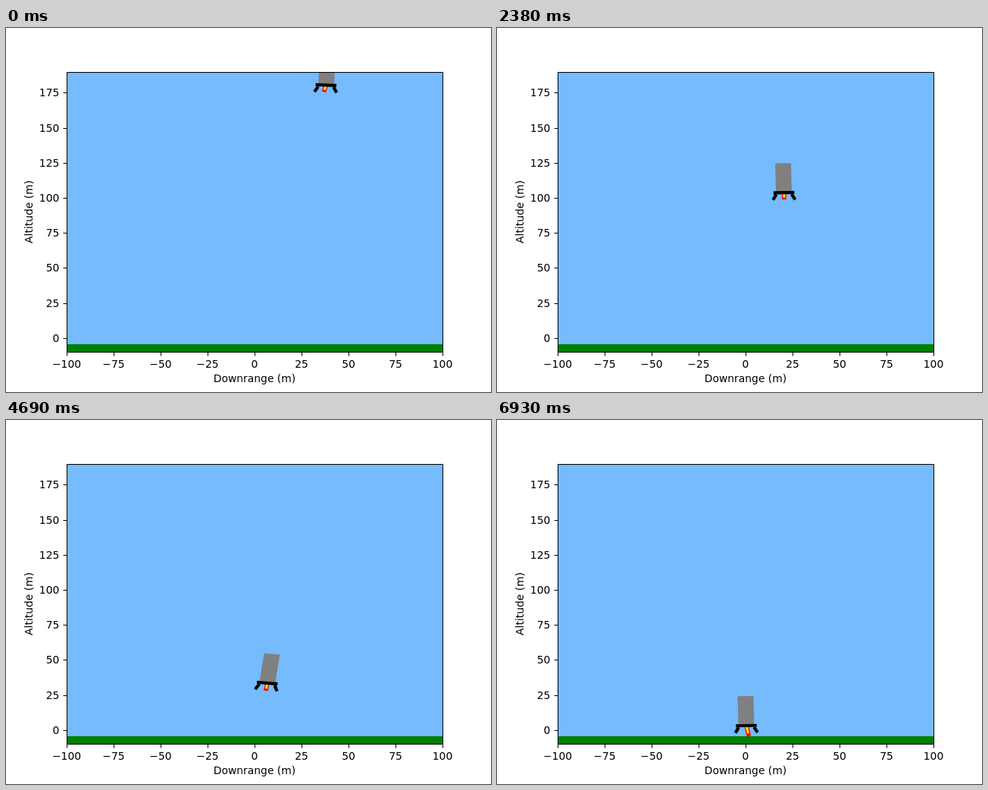
Write an HTML page that moves like this. It is 640 px wide and 480 px high and loops after 7000 ms.

```html
<!DOCTYPE html>
<html lang="en">
<head>
<meta charset="utf-8">
<title>Rocket landing</title>
<style>
  html, body { margin: 0; width: 100%; height: 100%; overflow: hidden; background: #fff; }
  svg { display: block; width: 640px; height: 480px; }
  text { font: 13.89px "DejaVu Sans", sans-serif; }
</style>
</head>
<body>
<svg viewBox="0 0 640 480">
  <defs><clipPath id="plot"><rect x="80" y="58" width="496" height="369.5"/></clipPath></defs>
  <rect x="80" y="58" width="496" height="369.5" fill="#75bbfd"/>
  <rect x="80" y="417" width="496" height="10.5" fill="#008000"/>
  <g clip-path="url(#plot)" fill="none">
    <path id="body" fill="#808080"/>
    <path id="fire" stroke="#f00" stroke-width="5.56"/>
    <path id="core" stroke="#ff0" stroke-width="2.78"/>
    <path id="gear" stroke="#000" stroke-width="4.17"/>
  </g>
  <path id="axes" fill="none" stroke="#000"/>
  <g id="labels">
    <text x="328" y="467" text-anchor="middle">Downrange (m)</text>
    <text transform="translate(35 242.4) rotate(-90)" text-anchor="middle">Altitude (m)</text>
  </g>
</svg>
<script>
const LOOP = 7000, STEP = 70;
const SX = 2.48, SY = 1.848; // pixels per metre
const $ = id => document.getElementById(id);

// Rows: seconds, x, y of the rocket's base in pixels
const path = [
  [422.3, 75.3], [408, 118.7], [393.3, 165], [379.8, 212.8], [366.8, 260],
  [355, 304], [345.5, 343.7], [338.2, 375.8], [332.7, 395.3], [329, 403]
].map((p, i) => [i * 0.77, ...p]);

// Rows: seconds, tilt (rad), flame slope, flame length
const attitude = [
  [0, 0.05, -0.34, 8.8],
  [1.05, 0.042, -0.05, 7.6],
  [2.38, -0.022, 0.05, 9],
  [3.64, 0.04, -0.01, 9.8],
  [4.69, 0.12, -0.19, 10],
  [6.02, 0.09, -0.12, 12.5],
  [6.93, -0.02, 0.25, 14]
];

// Cubic curve through the rows; returns every column at time t
function sample(rows, t) {
  const last = rows.length - 1;
  let i = 0;
  while (i < last - 1 && t > rows[i + 1][0]) i++;
  const a = rows[i], b = rows[i + 1], h = b[0] - a[0];
  const s = Math.min(1, (t - a[0]) / h);
  const slope = (k, c) => {
    const p = rows[Math.max(0, k - 1)], q = rows[Math.min(last, k + 1)];
    return (q[c] - p[c]) / (q[0] - p[0]);
  };
  return a.slice(1).map((_, j) => {
    const c = j + 1, d = b[c] - a[c];
    const m = slope(i, c) * h, n = slope(i + 1, c) * h;
    return a[c] + s * (m + s * (3 * d - 2 * m - n + s * (m + n - 2 * d)));
  });
}

const line = pts => "M" + pts.map(p => p.map(v => v.toFixed(2)).join()).join("L");

function draw(ms) {
  const t = Math.floor((ms % LOOP) / STEP) * STEP / 1000;
  const [x, y] = sample(path, t);
  const [tilt, lean, len] = sample(attitude, t);
  const c = Math.cos(tilt), s = Math.sin(tilt);
  // The plot's axes have unequal scales, so rotate in metres first
  const at = ([u, v]) => [x + SX * (u * c + v * s), y - SY * (v * c - u * s)];
  const shape = (...pts) => line(pts.map(at));
  const flame = k => line([[x, y], [x + lean * len * k, y + len * k]]);

  $("body").setAttribute("d", shape([-4.2, 0], [-4.2, 21], [4.2, 21], [4.2, 0]) + "Z");
  $("fire").setAttribute("d", flame(1));
  $("core").setAttribute("d", flame(0.73));
  $("gear").setAttribute("d",
    shape([-5.55, 0], [5.55, 0]) +
    shape([-4.1, -1.2], [-5.9, -5.1]) +
    shape([4.1, -1.2], [5.9, -5.1]));
}

function label(x, y, value, anchor) {
  const el = document.createElementNS("http://www.w3.org/2000/svg", "text");
  el.setAttribute("x", x);
  el.setAttribute("y", y);
  el.setAttribute("text-anchor", anchor);
  el.textContent = String(value).replace("-", "\u2212");
  $("labels").append(el);
}

function drawAxes() {
  let d = "M80.5 58.5H576.5V427.5H80.5Z";
  for (let v = -100; v <= 100; v += 25) {
    const x = 328 + v * SX;
    d += `M${x + 0.5} 428V432.5`;
    label(x, 448, v, "middle");
  }
  for (let v = 0; v <= 175; v += 25) {
    const y = Math.round(408.72 - v * SY);
    d += `M80 ${y + 0.5}H75.5`;
    label(70.3, y + 5, v, "end");
  }
  $("axes").setAttribute("d", d);
}

drawAxes();
const start = performance.now();
function tick() {
  draw(performance.now() - start);
  requestAnimationFrame(tick);
}
tick();
</script>
</body>
</html>
```
